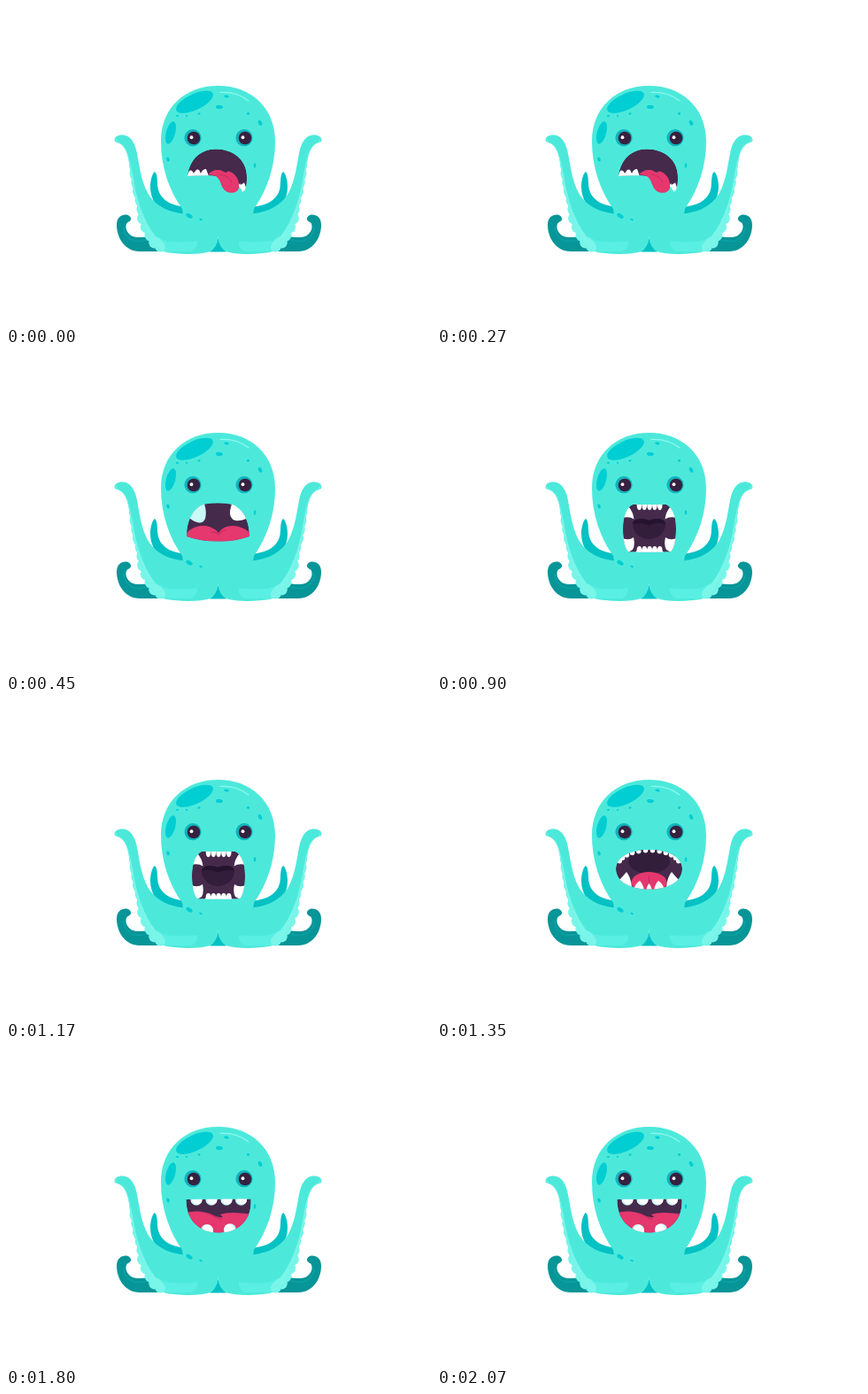
An HTML page with a canvas for the animation above (2250 ms loop, 480x360 px).

```html
<!DOCTYPE html>
<html lang="en">
<head>
<meta charset="utf-8">
<title>Octopus moods</title>
<style>
html, body { margin: 0; width: 100%; height: 100%; overflow: hidden; background: #fff; }
canvas { display: block; }
</style>
</head>
<body>
<canvas id="stage" width="480" height="360"></canvas>
<script>
const ctx = document.getElementById('stage').getContext('2d');
const HOLD = 450;
const C = {
  skin: '#4ce9db', pale: '#7af5e9', belly: '#59efe3', spot: '#00ced3', mid: '#04c1c4',
  deep: '#079598', deepEdge: '#0ba1a4', ring: '#12b3bc', eye: '#36213f',
  mouth: '#452a4c', throat: '#321e3b', throatDark: '#26142e',
  tongue: '#e4386e', tongueDark: '#c62c60', tooth: '#ffffff', toothShade: '#c9faf7'
};

function fill(d, color) {
  ctx.fillStyle = color;
  ctx.fill(new Path2D(d));
}

function line(d, color, width) {
  ctx.strokeStyle = color;
  ctx.lineWidth = width;
  ctx.lineCap = 'round';
  ctx.stroke(new Path2D(d));
}

function oval(x, y, rx, ry, color, tilt = 0) {
  ctx.fillStyle = color;
  ctx.beginPath();
  ctx.ellipse(x, y, rx, ry, tilt * Math.PI / 180, 0, Math.PI * 2);
  ctx.fill();
}

function bothSides(draw, axis = 239.5) {
  draw();
  ctx.save();
  ctx.translate(axis * 2, 0);
  ctx.scale(-1, 1);
  draw();
  ctx.restore();
}

function inMouth(d, draw) {
  ctx.save();
  ctx.clip(new Path2D(d));
  fill(d, C.mouth);
  draw();
  ctx.restore();
}

function backArm() {
  fill('M125 247C125 239 130 235.500 135 235.500C139 235.500 141.500 238 141 241' +
    'C140.500 243 138 243.500 136.500 245C134 249 136 256 142 259.500' +
    'C148 262 155 261 162 260L182 277L151 277C134 277 125 261 125 247Z', C.deep);
  line('M133 250C133 257 138 263 145 265C151 266 156 265 160 264', C.deepEdge, 1.5);
  fill('M168 187C165 189 163 197 163 204C163 218 171 231 186 238L208 238L206 227' +
    'C187 226 174 219 171.500 205C170.500 198 171.500 190 168 187Z', C.mid);
}

const ARM = 'M122.500 151C123 147 127 145.500 132 145.500C140 146 145 153 147.500 164' +
  'C150.500 178 152 196 160 211C169 226 184 234.500 212 235L240 235L239.500 263' +
  'C238.500 270 236 274 231 277C221 280 206 281 190 279C176 278 168 274 164 266' +
  'C157 253 152 241 149 228C143 208 141 190 138.500 174C136.500 161 131 155 125 154' +
  'C123 153.500 122.500 152 122.500 151Z';

function frontArm() {
  // Suckers follow the outer rim of the arm.
  const rim = [[142, 180], [143, 190], [145, 200], [147, 210], [150, 220],
    [152, 230], [153, 240], [157, 250], [162, 259], [167, 267], [174, 271]];
  rim.forEach(([x, y], i) => oval(x, y, 3 + i * 0.3, 5.6 + i * 0.1, C.pale, -12));
  fill(ARM, C.skin);
  ctx.save();
  ctx.clip(new Path2D(ARM));
  fill('M122 145L126 154C138 157 140 177 143 190C147 218 155 242 169 260' +
    'C178 264 183 268 183 273L176 281L150 281L132 180Z', C.pale);
  fill('M172 262C182 267 194 267 216 265.500Q217 273 209 277L178 277Q184 270 172 262Z', C.belly);
  ctx.restore();
}

function body() {
  bothSides(backArm, 240.5);
  bothSides(frontArm);
  fill('M239.500 90C203 90 175 114 175 153C175 181 184 208 199 229L204 260' +
    'L275 260L280 229C295 208 304 181 304 153C304 114 276 90 239.500 90Z', C.skin);
  fill('M230 277.500Q238 273 239.500 262Q241 273 249 277.500Z', C.mid);

  const spots = [[213, 108.3, 22.7, 9, -25], [186, 143, 5.2, 13, 15],
    [249, 102, 2.7, 1.4, 8], [241, 114, 4, 2.1, 5], [273.5, 121.5, 1.6, 1.4, 0],
    [287, 132, 2, 3, -28], [281, 180, 1.3, 2.7, 0], [207, 236.8, 4, 2.2, 30],
    [220, 241, 1.9, 1, 20], [193.5, 124, 1.6, 1, 0], [204, 124, 1.1, 0.9, 0],
    [218, 121.5, 1.6, 1.1, -15], [183, 173, 1.7, 2.6, -15]];
  for (const [x, y, rx, ry, tilt] of spots) oval(x, y, rx, ry, C.spot, tilt);
  line('M242 97.500C254 97 265 100 274 107', '#8ff8ef', 1.2);

  oval(211, 148.7, 9.6, 9.6, C.ring);
  oval(269, 148.7, 9.6, 9.6, C.ring);
  oval(212, 149, 7.3, 7.3, C.eye);
  oval(270, 149, 7.3, 7.3, C.eye);
  oval(209.5, 148.3, 1.9, 2, C.tooth);
  oval(267.5, 148.3, 1.9, 2, C.tooth);
}

function droolMouth() {
  inMouth('M205 192C207 174 219 161.500 237 161.500C258 161.500 273 175 272 195' +
    'C272 201 271 207 269 209C264 202 257 199 249 196C240 190 222 191 205 192Z', () => {
    fill('M204 193L207 186Q210 184 212 189Q215 183 218 185L220 189' +
      'Q222 184 226 184L229 192Z', C.tooth);
    fill('M261 206L264 200L266 204L269 199L273 211Z', C.tooth);
  });
  fill('M228 190.500C231 186 237 184 243 185.500L248 188L251 186.500' +
    'C259 188 264 196 263 205C262 211 253 213 247 208' +
    'C242 203 243 196 237 192C234 190.500 231 190.500 228 190.500Z', C.tongue);
  line('M242 190C248 191 253 194 255 199', C.tongueDark, 1);
  fill('M263 203L268 200L268 210.500Z', C.tooth);
}

function fangMouth() {
  inMouth('M204 207C204 188 212 174 224 170.500Q239 168 254 170.500' +
    'C267 174 275 189 275 207Q258 213 239.500 212.500Q219 212.500 204 207Z', () => {
    fill('M203 204C211 195 223 193 232 197Q237 199 240 203Q243 198 249 196' +
      'C259 193 269 197 277 204L276 215L203 215Z', C.tongue);
    line('M232 202Q238 202 240 205Q243 200 248 200', C.tongueDark, 1.2);
    fill('M210 174L224 170Q227 180 225 187Q222 193 216 191Q211 190 206 185Z', C.toothShade);
    fill('M255 170L270 175L273 186Q265 190 259 189Q252 187 253 178Z', C.tooth);
  });
}

function roarMouth() {
  inMouth('M221 171L259 171C266 174 270 185 270 198C270 210 268 220 264 224.500' +
    'L216 224.500C212 220 210 210 210 198C210 185 214 174 221 171Z', () => {
    fill('M221 193C222 186 233 186 239.500 189C246 186 257 186 258 193' +
      'C258 203 249 210 239.500 210C230 210 221 203 221 193Z', C.throat);
    fill('M221 193C222 186 233 186 239.500 189C246 186 257 186 258 193' +
      'Q247 190 239.500 195Q232 190 221 193Z', C.throatDark);
    for (let i = 0; i < 5; i++) {
      const x = 228.5 + i * 5.8;
      oval(x, 172, 2.8, 5.2, C.tooth);
      oval(x, 223, 2.9, 5, C.tooth);
    }
    fill('M224 225L227 221.500L253 221.500L256 225Z', C.tooth);
    bothSides(() => {
      fill('M209 186L216 173Q221.500 179 222.500 187.500Q217 184 209 186Z', C.tooth);
      fill('M209 209Q217 212 222 208Q224 217 221 222L214 226Z', C.tooth);
    }, 240);
  });
}

function sharkMouth() {
  const shape = 'M202 190C203 176 220 169 239.500 169C259 169 276 176 277 190' +
    'C277 206 260 213.500 239.500 213.500C219 213.500 202 206 202 190Z';
  inMouth(shape, () => {
    oval(239.5, 182, 23.5, 14, C.throat);
    oval(239.5, 206, 20, 12, C.tongue);
    line('M239.500 199L239.500 206', C.tongueDark, 1.2);
    for (let i = 0; i < 12; i++) {
      const a = Math.PI * (1.1 + i * 0.8 / 11);
      oval(239.5 + Math.cos(a) * 35, 187 + Math.sin(a) * 17.5, 2.8, 3, C.tooth);
    }
    bothSides(() => {
      fill('M205 204Q210 199 214 194Q219 200 220 211L211 213Z', C.tooth);
      fill('M222 215Q223 208 229 204Q233 208 234 215Z', C.tooth);
    });
    fill('M236 215Q237 210 239.500 207Q242 210 243 215Z', C.tooth);
  });
}

function happyMouth() {
  inMouth('M203.500 172L276.500 171.500C278 194 264 209.500 240 209.500' +
    'C217 209.500 203 194 203.500 172Z', () => {
    fill('M202 188C211 184 223 185 232 189Q238 193 245 192L242 189' +
      'Q253 185 278 189L276 211L203 211Z', C.tongue);
    line('M229 188Q236 191 243 195', C.tongueDark, 1.2);
    for (const x of [215, 232, 249, 265.5]) oval(x, 172, 6.6, 6.8, C.toothShade);
    for (const x of [216, 233, 250, 266.5]) oval(x, 171.5, 5.6, 6.2, C.tooth);
    oval(227, 207, 7, 7, C.toothShade);
    oval(228, 207, 5.8, 6.2, C.tooth);
    oval(253, 206, 7, 6.8, C.toothShade);
    oval(252, 206, 5.7, 6, C.tooth);
  });
}

const mouths = [droolMouth, fangMouth, roarMouth, sharkMouth, happyMouth];
const start = performance.now();

function frame() {
  const t = Math.max(0, performance.now() - start);
  ctx.fillStyle = '#fff';
  ctx.fillRect(0, 0, 480, 360);
  body();
  mouths[Math.floor(t / HOLD) % mouths.length]();
  requestAnimationFrame(frame);
}
frame();
</script>
</body>
</html>
```
